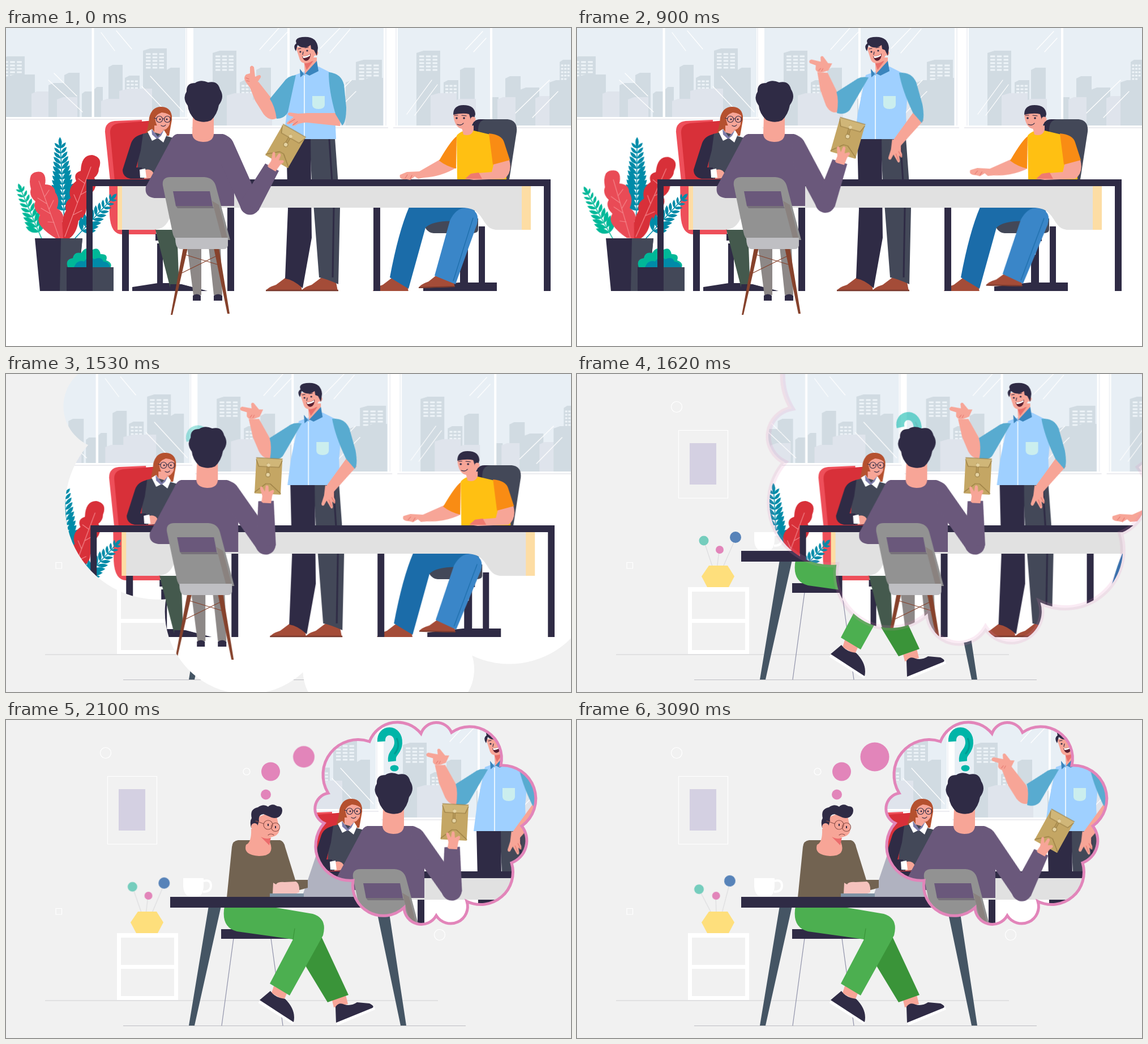
An HTML page for the animation above (3.12 s loop, 998 by 561 pixels).

```html
<!DOCTYPE html>
<html lang="en">
<head>
<meta charset="utf-8">
<title>Thinking about the meeting</title>
<style>
html, body { margin: 0; width: 100%; height: 100%; overflow: hidden; background: #f1f1f1; }
svg { display: block; width: 998px; height: 561px; }
:root { --loop: 3120ms ease-in-out infinite; }

.cloud { animation: cloud 3120ms linear infinite; }
@keyframes cloud {
  0%, 41.67% { transform: translate(-3234px, -862px) scale(5); }
  54.49%, 100% { transform: none; }
}
.rim { animation: rim 3120ms linear infinite; }
@keyframes rim { 0%, 51.5% { opacity: 0; } 54.2%, 100% { opacity: 1; } }
.office { animation: slide 3120ms linear infinite; }
@keyframes slide {
  0%, 49% { transform: none; animation-timing-function: cubic-bezier(.3, .75, .4, 1); }
  57.2%, 100% { transform: translateX(336px); }
}
.mark { transform-origin: 349px 90px; animation: mark 3120ms linear infinite; }
@keyframes mark {
  0%, 47.4% { transform: translateY(85px) rotate(-10deg); opacity: 0; }
  49% { transform: translateY(76px) rotate(-10deg); opacity: .35; }
  54.8% { transform: translateY(30px) rotate(-6deg); opacity: .75; animation-timing-function: ease-out; }
  64%, 100% { transform: none; opacity: 1; }
}

.sway { transform-origin: 100px 370px; animation: sway var(--loop); }
@keyframes sway { 0%, 51.2%, 100% { transform: none; } 26.5% { transform: rotate(3.6deg); } }
.swayL { transform-origin: 66px 368px; animation: swayL var(--loop); }
@keyframes swayL { 0%, 51.2%, 100% { transform: none; } 24% { transform: rotate(-6.5deg); } }

/* standing man: raised arm */
.sh1 { transform-origin: 500px 95px; animation: sh1 var(--loop); }
@keyframes sh1 { 0% { transform: none; } 14.4% { transform: rotate(4deg); } 28.8%, 100% { transform: rotate(18deg); } }
.el1 { transform-origin: 466px 148px; animation: el1 var(--loop); }
@keyframes el1 {
  0% { transform: none; } 14.4% { transform: rotate(-7deg); } 28.8% { transform: rotate(-6deg); }
  49%, 82.7% { transform: rotate(-9deg); } 99%, 100% { transform: rotate(-18deg); }
}
.ha1 { transform-origin: 433px 90px; animation: ha1 var(--loop); }
@keyframes ha1 {
  0% { transform: none; } 14.4% { transform: rotate(-19deg); }
  28.8%, 82.7% { transform: translateY(-4px) rotate(-82deg); } 99%, 100% { transform: rotate(-72deg); }
}
/* standing man: lowered arm */
.sh2 { transform-origin: 575px 85px; animation: sh2 var(--loop); }
@keyframes sh2 { 0%, 15% { transform: none; } 28%, 100% { transform: rotate(-10deg); } }
.el2 { transform-origin: 588px 160px; animation: el2 var(--loop); }
@keyframes el2 { 0% { transform: none; } 14.4% { transform: rotate(-7deg); } 28%, 100% { transform: rotate(-44deg); } }
.ha2 { transform-origin: 527px 158px; animation: ha2 var(--loop); }
@keyframes ha2 { 0% { transform: none; } 14.4% { transform: rotate(-28deg); } 28%, 100% { transform: rotate(-26deg); } }
/* seated man: arm with envelope */
.sh3 { transform-origin: 385px 200px; animation: sh3 var(--loop); }
@keyframes sh3 { 0%, 20% { transform: none; } 28.8% { transform: rotate(-4deg); } 36%, 82% { transform: rotate(-11deg); } 99%, 100% { transform: rotate(-10deg); } }
.el3 { transform-origin: 431px 312px; animation: el3 var(--loop); }
@keyframes el3 { 0%, 20% { transform: none; } 28.8% { transform: rotate(-7deg); } 36%, 82% { transform: rotate(-19deg); } 99%, 100% { transform: rotate(6deg); } }
.ha3 { transform-origin: 470px 246px; animation: ha3 var(--loop); }
@keyframes ha3 { 0%, 20% { transform: none; } 28.8% { transform: rotate(-3deg); } 36%, 100% { transform: rotate(3deg); } }
/* man in yellow */
.reach { transform-origin: 775px 242px; animation: reach var(--loop); }
@keyframes reach { 0% { transform: none; } 12%, 100% { transform: rotate(6deg); } }
.shin { transform-origin: 812px 335px; animation: shin var(--loop); }
@keyframes shin { 0% { transform: none; } 12%, 100% { transform: rotate(3deg); } }

.balls { transform-origin: 249px 350px; animation: balls var(--loop); }
@keyframes balls { 0%, 54.8% { transform: none; } 82.7% { transform: rotate(-1.5deg); } 99%, 100% { transform: rotate(-9deg); } }
.dot { transform-box: fill-box; transform-origin: center; animation: pop 3120ms ease-out infinite; }
@keyframes pop { 0%, 56% { transform: scale(0); } 62%, 100% { transform: none; } }
.dot.b { animation-name: pop2; }
@keyframes pop2 { 0%, 60% { transform: scale(0); } 66%, 100% { transform: none; } }
.dot.c { animation-name: pop3; }
@keyframes pop3 { 0%, 64% { transform: scale(0); } 70%, 100% { transform: none; } }

.n { fill: #2f2b45; } .g { fill: #434858; } .s { fill: #f7a597; } .w { fill: #fff; }
.r { fill: #a44c38; } .p { fill: #6a587b; } .bl { fill: #58abd0; }
.line { fill: none; stroke-width: 1.2; stroke-linecap: round; stroke-linejoin: round; }
</style>
</head>
<body>
<svg viewBox="0 0 998 561" xmlns="http://www.w3.org/2000/svg">
<defs>
  <path id="puff" d="M569 129A62 62 0 0 1 642 38A53 53 0 0 1 733 24A29 29 0 0 1 787 22A56 56 0 0 1 874 80A59 59 0 0 1 911 187A42 42 0 0 1 893 252A57 57 0 0 1 814 320A30 30 0 0 1 760 345A30.5 30.5 0 0 1 703 331A54 54 0 0 1 613 283A61 61 0 0 1 562 182A28 28 0 0 1 569 129Z"/>
  <clipPath id="mask"><path class="cloud" d="M569 129A62 62 0 0 1 642 38A53 53 0 0 1 733 24A29 29 0 0 1 787 22A56 56 0 0 1 874 80A59 59 0 0 1 911 187A42 42 0 0 1 893 252A57 57 0 0 1 814 320A30 30 0 0 1 760 345A30.5 30.5 0 0 1 703 331A54 54 0 0 1 613 283A61 61 0 0 1 562 182A28 28 0 0 1 569 129Z"/></clipPath>
  <path id="shoe" d="M0 24Q2 18 18 13L34 1Q48-4 60 3L64 24Z"/>
</defs>

<!-- room -->
<rect width="998" height="561" fill="#f1f1f1"/>
<g class="line" stroke="#fff">
  <circle cx="176" cy="58" r="9.5"/><circle cx="425" cy="91" r="6"/><circle cx="766" cy="379" r="9.5"/>
  <path d="M88 332.500h10.500v10.500h-10.500zM179.500 99.500h87v119.500h-87z"/>
</g>
<rect x="199" y="122" width="47" height="73" fill="#d4d0e2"/>
<path d="M69 495H763" stroke="#cfcfd2"/><path d="M207 539.500H812" stroke="#bdbdc2"/>
<path class="w" d="M196 376h108v118h-108zM313 279h36v14q-1 18-11 18h-14q-10-2-11-18z"/>
<path d="M349 284q13-3 13 8t-14 11" fill="none" stroke="#fff" stroke-width="4"/>
<path d="M203 384h94v48h-94zM203 439h94v48h-94z" fill="#f1f1f1"/>
<g class="balls">
  <path d="M241 345L225 297M247 345L251 312M256 345L280 290" class="line" stroke="#dcdcde"/>
  <circle cx="224" cy="294" r="8.500" fill="#75cdbd"/><circle cx="252" cy="310" r="7" fill="#e285ba"/><circle cx="280" cy="288" r="10" fill="#5783b9"/>
</g>
<path d="M233 338h33l12 19-10 19h-38l-10-19z" fill="#fedf7c"/>

<!-- man at the laptop -->
<path d="M402 385L381 539M468 385L489 539" class="line" stroke="#9092aa"/>
<path class="n" d="M380 369h125v17h-125z"/>
<path class="s" d="M574 486l25-5 5 20-25 6zM474 466l24 12-7 16-22-12z"/>
<path d="M528 432L557 382 605 485 568 498z" fill="#3a9439"/>
<path d="M386 328H460L542 342Q568 350 560 380L501 486 466 465 507 387 408 373Q379 366 386 328Z" fill="#4caf50"/>
<path d="M507 387L510 368" stroke="#3a9439" class="line"/>
<path class="n" stroke="#fff" stroke-width="5" d="M447 497L508 535"/><path class="n" d="M467 478Q475 490 493 492 513 512 508 533L448 494Z"/>
<path stroke="#fff" stroke-width="6" d="M584 536L651 508"/><path class="n" d="M582 506Q588 497 598 502 610 505 620 498L642 500Q652 505 647 508L583 534Z"/>
<path d="M358 328h22L333 539H323zM653 328h22L707 539H697z" fill="#455564"/>
<path d="M523 312L549 235H650V312Z" fill="#b0b2c0"/>
<path d="M399 224Q400 213 410 212H484Q491 214 493 224L511 282H533V296L470 313Q428 318 390 313Z" fill="#726351"/>
<path class="s" d="M433 192H466V215Q476 240 447 240 418 238 424 220Q434 216 433 192Z"/>
<path class="s" d="M441 173L461 165 478 170 483 192Q482 206 466 207 447 208 440 190Z"/>
<path d="M450 206q12 6 18 1l-3 14z" fill="#ec6c6c"/>
<path class="n" d="M433 190Q430 179 434 173 430 157 445 154 455 147 463 153 470 146 479 152 491 152 487 165 481 176 469 172L455 166Q445 167 447 178L443 191Z"/>
<circle class="s" cx="439" cy="188" r="6"/>
<g class="line" stroke="#92534c"><circle cx="463" cy="185" r="8"/><circle cx="476" cy="189" r="7.500"/><path d="M441 178L455 183M463 203q5-4 10 0"/></g>
<path class="n" d="M462 183h2v4h-2zM475 187h2v4h-2z"/>
<path d="M472 287L477 290Q480 285 492 286L512 285Q519 288 518 304L510 307H471Z" fill="#f5c2bd"/>
<path d="M466 306h60v6h-60z" fill="#8093a5"/>
<path class="n" d="M290 312H740V331H290z"/>

<g fill="#e285ba">
  <circle class="dot" cx="459" cy="131.500" r="9"/><circle class="dot b" cx="467.500" cy="91" r="16.500"/><circle class="dot c" cx="526" cy="65" r="25.500"/>
</g>

<!-- imagined office -->
<g clip-path="url(#mask)"><g class="office">
  <rect x="-400" width="1800" height="600" fill="#fff"/>
  <rect x="-400" width="717" height="157" fill="#e8eff5"/>
  <path d="M331 0H667V172H331zM692 0H998V172H692z" fill="#e8eff5"/>
  <path d="M0 161H322M327 176H675M684 176H998" stroke="#ececf0" stroke-width="2"/>
  <path d="M319 0V157M671 0V172M689 0V172" stroke="#f0f2f6" stroke-width="2"/>
  <g id="left"></g><g id="mid"></g><g id="right" transform="translate(360)"></g>
  <path d="M153.500 0V157M499 0V172M857 0V172" stroke="#fff" stroke-width="4"/>
  <path class="line" stroke="#fff" d="M255 85L313 148M240 103L285 150M75 92L135 148M85 80L125 120M168 8L192 40M195 5L222 37M448 38L482 0M466 40L500 4M555 36L590 0M572 44L608 2M548 155L610 92M570 160L618 112M708 152L752 92M722 154L762 100M812 38L842 6M826 42L848 18M900 150L960 92M930 158L975 112"/>

  <!-- woman -->
  <path d="M182 270H265V364H205Q185 364 183 330Z" fill="#ee4f5a"/>
  <path d="M175 184Q174 166 192 164L240 162V270H184Z" fill="#ee4f5a"/>
  <path d="M184 186Q183 170 200 168L262 163V270H192Z" fill="#d83039"/>
  <path class="n" d="M264 363h13v12h-13zM267 380h10v74h-10zM223 464V457L268 450H300L356 464z"/>
  <path d="M264 356H302L306 462H291L274 396Z" fill="#44594d"/><path class="n" d="M290 463V452H310L352 463z"/>
  <path d="M245 190Q252 176 253 158 258 138 275 139 294 140 293 162L288 190Z" fill="#b5512f"/>
  <path class="s" d="M262 172h16v20h-16zM263 152Q276 144 290 154L289 170Q285 180 276 180 263 176 263 152Z"/>
  <path d="M261 165Q263 153 275 149 289 150 293 158 292 141 276 140 258 142 257 160L252 186 262 180Z" fill="#b5512f"/>
  <path class="g" d="M240 187L258 183 282 190 302 196 292 266H232Q232 222 240 187Z"/>
  <path class="n" d="M242 187Q226 190 221 203L206 250Q206 263 220 266H240V246H230L238 216Z"/>
  <path class="w" d="M250 183L258 178 268 193 279 180 284 188 278 202 268 194 258 199z"/><path d="M257 178L268 192 279 180 274 190 267 196 258 188z" fill="#7b7aa8"/>
  <path class="s" d="M246 250Q260 247 263 264L244 266z"/><path class="w" d="M236 250l10-2 2 16h-11z"/>
  <g class="line" stroke="#2f2b45" stroke-width="1.700"><circle cx="271" cy="161" r="5.500"/><circle cx="285" cy="161" r="5.500"/><path d="M262 159L266 160M276.500 160H279.500M274 172q5 3 8-1"/></g>
  <circle class="n" cx="272" cy="161" r="1.500"/><circle class="n" cx="284" cy="161" r="1.500"/>

  <!-- man in yellow -->
  <path class="n" d="M822 180Q822 161 838 161H874V267H815Z"/><path class="g" d="M834 178Q835 161 850 161H886Q904 163 902 183L889 267H834Z"/>
  <path class="g" d="M737 336H834V356Q834 362 822 362H755Q738 360 737 336Z"/>
  <path class="n" d="M813 362h8v14h-5v76h-14V400h8zM737 464V456L800 449H867V464z"/>
  <use href="#shoe" class="r" transform="translate(648 440) scale(.98 1)"/>
  <path d="M712 316H828V344Q760 334 741 352L711 460 678 440Q693 360 712 316Z" fill="#1b6ca9"/>
  <g class="shin">
    <use href="#shoe" class="r" transform="translate(728 435) rotate(-2)"/><path d="M729 458L793 456" stroke="#7a392c" stroke-width="2"/>
    <path d="M784 340Q795 316 815 317 838 322 832 346L794 452 757 437Z" fill="#3a86c8"/>
    <path class="line" stroke="#1b6ca9" d="M825 335L790 446"/>
  </g>
  <path d="M796 190Q803 180 822 180L864 190Q880 202 884 240V268H797Z" fill="#ffc012"/>
  <path class="s" d="M804 172H826V180Q822 192 808 188z"/>
  <path class="s" d="M790 152Q806 142 824 150L826 166Q820 178 806 178 792 176 790 152Z"/>
  <path class="n" d="M790 153Q790 136 808 136 828 136 829 152L826 163 821 162 818 152Q808 149 790 153Z"/>
  <circle class="s" cx="825" cy="161" r="4.500"/><circle class="n" cx="796" cy="159" r="1.800"/><circle class="n" cx="809" cy="159" r="1.800"/>
  <path class="line" stroke="#2f2b45" d="M792 154L798 154M805 154L813 155M797 170q7 3 11-2"/>

  <!-- standing man -->
  <use href="#shoe" class="r" transform="translate(459 440)"/><use href="#shoe" class="r" transform="translate(522 440)"/>
  <path d="M459 463H523M523 463H587" stroke="#7a392c" stroke-width="2.500"/>
  <path class="g" d="M536 194H581L590 318 587 452Q565 442 553 440L540 270Z"/>
  <path class="n" d="M495 194H538L540 370 524 459Q508 444 493 442L498 320Z"/>
  <path d="M571 196L579 318 577 440" fill="none" stroke="#2f2b45" stroke-width="3"/>
  <path d="M510 83L552 68 580 82Q586 110 581 150L583 196H490L496 150Z" fill="#9fd0ff"/>
  <path d="M527 84V196" stroke="#e5f4ff" stroke-width="2"/><path d="M541 120H563V136Q562 143 552 143 542 143 541 136Z" fill="#cbeeee"/>
  <path class="s" d="M526 52H549V72L528 82Z"/><path d="M527 62l16-4-12 16z" fill="#e9706b"/>
  <path d="M519 72L527 82 549 58 552 76 536 84 528 80 520 87z" fill="#3a85bd"/>
  <path class="s" d="M512 34L541 29 548 44 538 60Q524 66 519 56Z"/><circle class="s" cx="547" cy="44" r="4.500"/>
  <path class="n" d="M512 41Q506 32 513 27 509 18 523 16 549 13 551 35L549 49 544 39 539 37 538 30Q526 39 515 30Z"/>
  <path d="M523 50Q532 50 538 45 538 57 530 58 525 57 523 50Z" fill="#5b2030"/><path class="w" d="M524 50q8 0 13-4l0 3q-6 4-12 4z"/>
  <circle class="n" cx="520" cy="42" r="1.600"/><circle class="n" cx="532" cy="40" r="1.600"/><path class="line" stroke="#2f2b45" d="M516 37l5-1M528 35l6-1M525 42l-1 5"/>
  <g class="sh1">
    <g class="el1">
      <path class="s" d="M428 98L446 95 472 128 483 156Q468 168 455 152L440 128Z"/>
      <g class="ha1"><path class="s" d="M424 96Q418 88 424 82L431 80 431 69Q434 64 438 69L440 86 447 83Q451 83 450 87L442 99 444 106 430 104Z"/>
      <path class="line" stroke="#e4776f" d="M424 88l5 2M425 93l5 1"/></g>
    </g>
    <path class="bl" d="M512 83Q498 84 490 96L466 125Q475 138 478 160 492 160 498 148Z"/>
  </g>

  <!-- plants -->
  <g class="swayL" id="fronds1"></g>
  <g class="sway"><g id="fronds2"></g>
    <path d="M100 371Q95 340 106 322 102 308 114 300 108 282 124 270 118 256 132 252 133 224 152 224 172 228 164 248 164 258 156 264 164 282 148 294 155 308 142 318 141 334 128 340 125 362 112 371Z" fill="#d83039"/>
    <path d="M88 371Q72 362 62 350 54 340 60 330 46 318 52 306 40 296 44 284 40 270 44 260 50 252 62 254 72 258 69 276 86 276 87 290 96 302 90 318 106 328 99 342L101 371Z" fill="#e94b56"/>
    <path class="line" stroke="#f4868b" d="M94 370L58 270M72 310L56 300M79 328L62 318M85 343L74 342M68 298L76 286M76 320L84 304M104 368L150 245M126 308L120 294M132 294L146 286M118 330L134 322M139 274L128 266"/>
  </g>
  <g id="fronds3"></g>
  <path class="n" d="M51 371H135L126 464H60z"/><path class="g" d="M97 371H135L126 464H95z"/>
  <path d="M109 422Q104 408 118 406 120 394 133 397 140 384 151 392 164 384 167 399 181 398 177 410 188 414 185 422Z" fill="#00b898"/>
  <path d="M120 422Q126 408 138 412 146 400 156 408 168 402 172 412 182 412 184 422Z" fill="#008ba8"/>
  <path class="n" d="M107 422h83v42h-83z"/><path class="g" d="M149 422h41v42h-41z"/>

  <!-- desk -->
  <path d="M197 279h8v77h-8zM911 279h16v77h-16z" fill="#fddda4"/>
  <path class="n" d="M142 279h11v185h-11zM205 350h12v114h-12zM391 300h12v164h-12zM649 310h12v154h-12zM835 350h11v114h-11zM950 279h12v185h-12z"/>
  <path d="M205 279H911V356H868C838 356 848 317 806 317H312C282 317 298 356 258 356H205Z" fill="#e1e1e1"/>
  <path class="n" d="M142 267H962V279H142z"/>
  <g class="reach"><path class="s" d="M770 230L796 246Q770 262 738 264L728 266 722 262 714 268 708 267 702 267Q694 266 696 259L708 254 730 253Z"/><path class="line" stroke="#e4776f" d="M714 266l3-6M705 265l4-6"/></g>
  <path d="M796 191Q786 198 765 234 778 244 795 248Z" fill="#f98c14"/>
  <path class="s" d="M862 238L889 232Q895 256 880 266L826 268 811 266 822 257 858 254Z"/><path d="M811 266l10-9 14-2 6 11z" fill="#ef7a70"/>
  <path d="M853 186Q876 188 880 202L890 233 860 241Z" fill="#f98c14"/>

  <!-- seated man, seen from behind -->
  <g class="mark"><path d="M327 38C325 14 358 13 357 41 356 58 344 56 346 73" fill="none" stroke="#00b5a8" stroke-width="14"/><path d="M354 32Q361 48 350 60" fill="none" stroke="#009c93" stroke-width="3"/><ellipse cx="350" cy="85" rx="7.500" ry="5.500" fill="#00b5a8"/></g>
  <path d="M320 386H345V471H331zM358 386H379L382 471H367z" fill="#8d8887"/>
  <path class="n" d="M330 481V472Q337 467 344 472V481zM367 481V472Q375 467 382 472V481z"/>
  <path class="p" d="M302 187H383Q396 190 403 210V314H290L286 300H262Q244 298 247 280L290 200Q294 189 302 187Z"/>
  <path class="s" d="M330 156H367V187Q366 201 348 201 330 200 329 187Z"/>
  <path class="n" d="M334 162Q322 150 321 137 311 124 319 112 318 97 334 97 344 90 357 96 374 92 378 108 387 122 376 136 373 153 362 163 349 169 334 162Z"/>
  <g class="sh3">
    <path class="p" d="M380 187Q397 190 402 203L448 306 416 320 380 240Z"/>
    <g class="el3">
      <circle class="p" cx="431" cy="312" r="17.500"/><path class="p" d="M415 306L458 239 482 252 446 322z"/>
      <g class="ha3"><g transform="translate(494 208) rotate(30)">
        <path class="s" d="M-8 28H9L7 48H-8z"/>
        <path d="M-23-31H23V32H-23z" fill="#c4a664"/><path d="M-23-31H23V-27L18-16H-18L-23-27Z" fill="#d0b678"/>
        <path class="line" stroke="#967a40" d="M-23-28L-18-16H18L23-28M-23-31H23M-23 30L-4 14H4L23 30M0-22V0M-3-22V0"/>
        <circle cx="-1" cy="-19" r="3" fill="#e5d3a2"/><circle cx="-1" cy="-2" r="4" fill="#e5d3a2" stroke="#967a40"/>
        <path class="s" d="M-10 47L-9 36-14 22Q-13 18-10 20L-5 28-4 18Q-1 15 1 19L2 28 9 24Q12 25 11 28L7 37 7 47Z"/>
      </g></g>
    </g>
  </g>
  <path d="M313 388h8L294 506h-3zM367 388h9L395 504h-4z" fill="#86422c"/>
  <path class="line" stroke="#86422c" d="M317 400L376 418M372 402L311 432"/>
  <path fill-rule="evenodd" d="M277 278Q275 263 290 263H350Q367 264 371 280L396 374H303Q296 372 294 360ZM295 288L300 314H365L360 288Z" fill="#929292"/>
  <path d="M364 305L376 312 391 370H381Z" fill="#8a827f"/><path d="M300 314L303 318H367L365 314Z" fill="#77727a"/>
  <path d="M299 370H392V384Q391 390 384 390H308Q299 389 299 370Z" fill="#bfbfc3"/>

  <!-- standing man: near arm -->
  <g class="sh2">
    <g class="el2">
      <path class="s" d="M592 150L530 150 524 166 590 173Z"/>
      <g class="ha2"><path class="s" d="M534 150L516 151 501 149Q496 150 499 154L508 157 496 167Q495 170 499 170L508 167 505 172Q509 174 516 169L532 166Z"/><path class="line" stroke="#e4776f" d="M500 167l10-6M507 171l8-6"/></g>
    </g>
    <path class="bl" d="M570 78Q592 80 597 100L601 140Q601 166 594 172L582 152Q570 110 570 78Z"/>
  </g>
</g></g>
<g class="rim"><use href="#puff" class="cloud" fill="none" stroke="#e285ba" stroke-width="5" vector-effect="non-scaling-stroke"/></g>
</svg>

<script>
const put = (id, html) => { document.getElementById(id).innerHTML = html; };

// Tower: x, top, width, bottom, tone (0 pale, 1 dark, 2 dark with windows)
function tower([x, y, w, base, tone]) {
  let out = `<path d="M${x} ${y + 4}L${x + w * .3} ${y}H${x + w}V${base}H${x}Z" fill="${tone ? '#d1dbe2' : '#dfe4ec'}"/>`;
  if (tone < 2) return out;
  let d = '';
  for (let r = 0; r < 5; r++)
    for (let c = 0; c < 3; c++) d += `M${x + w * (.12 + c * .28)} ${y + 10 + r * 6}h${w * .2}`;
  return out + `<path d="${d}" stroke="#eef4f8" stroke-width="3"/>`;
}
const leftTowers = [
  [-10, 50, 43, 157, 2], [0, 82, 51, 157, 1], [45, 112, 32, 157, 0], [75, 97, 30, 157, 1], [103, 79, 27, 157, 1],
  [90, 122, 36, 157, 0], [134, 112, 18, 157, 1], [156, 104, 15, 157, 1], [181, 65, 25, 157, 1], [242, 36, 42, 157, 2],
  [210, 84, 26, 157, 2], [200, 107, 58, 157, 0], [168, 125, 34, 157, 0], [284, 70, 23, 157, 1]];
const midTowers = [
  [365, 40, 42, 172, 2], [413, 92, 26, 172, 2], [442, 70, 26, 172, 1], [390, 115, 46, 172, 0], [430, 125, 40, 172, 0],
  [495, 122, 15, 172, 1], [522, 85, 27, 172, 1], [548, 105, 34, 172, 1], [508, 122, 32, 172, 0], [575, 120, 30, 172, 0],
  [618, 56, 46, 172, 2], [600, 92, 38, 172, 1], [630, 88, 36, 172, 1]];
put('left', leftTowers.map(tower).join(''));
put('mid', midTowers.map(tower).join(''));
put('right', midTowers.map(t => t[0] > 600 ? [t[0], t[1], Math.min(t[2], 638 - t[0]), t[3], t[4]] : t).map(tower).join(''));

function frond(x, y, turn, len, leaf, color) {
  let d = '';
  const n = Math.round(len / 11);
  for (let i = 0; i <= n; i++) {
    const w = leaf * (1.1 - .6 * i / n), at = -(len - leaf) * i / n;
    for (const s of [-1, 1])
      d += `M0 ${at}q${s * w * .2} ${-w * .8} ${s * w} ${-w}q${-s * w * .1} ${w * .9} ${-s * w} ${w}`;
  }
  d += `M0 ${leaf - len}q-6 ${-leaf * .6} 0 ${-leaf}q6 ${leaf * .4} 0 ${leaf}`;
  return `<g transform="translate(${x} ${y}) rotate(${turn})"><path d="${d}" fill="${color}"/><path d="M0 30V${-len + 8}" stroke="${color}" stroke-width="1.5"/></g>`;
}
put('fronds1', frond(58, 360, -23, 93, 16, '#00b898'));
put('fronds2', frond(102, 322, -3, 130, 20, '#008ba8'));
put('fronds3', frond(134, 358, 43, 90, 16, '#008ba8'));
</script>
</body>
</html>
```
